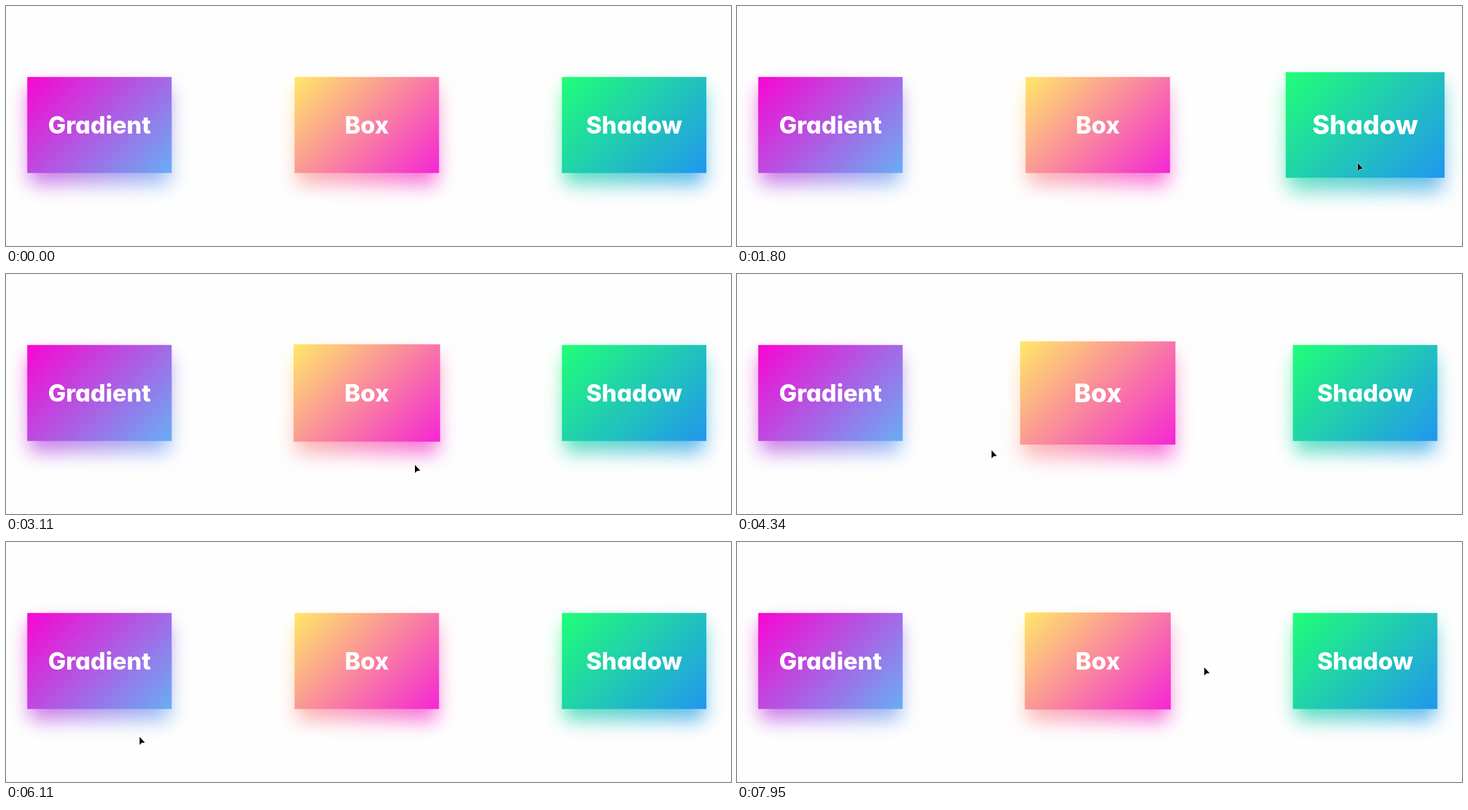
These frames come from a looping animation (1280 px wide and 425 px high, 8 s). An HTML page:

```html
<!DOCTYPE html>
<html lang="en">
<head>
<meta charset="utf-8">
<title>Gradient Box Shadow</title>
<style>
  html, body { margin: 0; width: 100%; height: 100%; overflow: hidden; background: #fefefe; }
  .stage { position: relative; width: 1280px; height: 425px; overflow: hidden; }
  .card { position: absolute; left: 0; top: 0; width: 255px; height: 170px; }
  .glow, .face { position: absolute; inset: 0; background: linear-gradient(135deg, var(--from), var(--to)); }
  .glow { inset: 20px 4px -20px; filter: blur(17px); opacity: .72; }
  .face {
    color: #fff; text-align: center; white-space: nowrap;
    font: 800 42px/169px Inter, "Open Sans", sans-serif;
    font-feature-settings: "cv11";
  }
  .gradient { --from: #f805d2; --to: #68aef4; }
  .box { --from: #ffe868; --to: #f426d5; }
  .shadow { --from: #20ff77; --to: #2196ef; }
  .cursor { position: absolute; left: 0; top: 0; width: 16px; height: 20px; overflow: visible; }
  .cursor path { stroke: #fff; stroke-width: 1.2; stroke-linejoin: round; paint-order: stroke; }
</style>
</head>
<body>
<div class="stage">
  <div class="card gradient"><div class="glow"></div><div class="face">Gradient</div></div>
  <div class="card box"><div class="glow"></div><div class="face">Box</div></div>
  <div class="card shadow"><div class="glow"></div><div class="face">Shadow</div></div>
  <svg class="cursor"><path d="M0 0V14.4L3.6 10.8L9.4 10.2Z"/></svg>
</div>
<script>
const LOOP = 8000, START = 500, STEP = 1000 / 13;
const FADE = 300, GROW = .1;
const WIDTH = 255, HEIGHT = 170, LEFT = 37.5, TOP = 125.7, GAP = 472;

// Turning points of the pointer: time, x, y
const path = [
  [500, 1010, 388], [1000, 1115, 235], [1800, 1096, 278], [2000, 950, 265],
  [2640, 655, 225], [3110, 722, 338], [3450, 665, 250], [4100, 610, 240],
  [4340, 448, 312], [4650, 160, 215], [5260, 250, 251], [6100, 236, 345],
  [6340, 224, 320], [6900, 49, 317], [7180, 55, 314], [7420, 130, 250],
  [7800, 774, 223], [7950, 825, 222]
];

const clamp = v => Math.max(0, Math.min(1, v));

// cubic-bezier(.25, .1, .25, 1)
function ease(x) {
  x = clamp(x);
  let lo = 0, hi = 1;
  const curve = (u, a, b) => 3 * a * u * (1 - u) ** 2 + 3 * b * u * u * (1 - u) + u ** 3;
  for (let i = 0; i < 20; i++) {
    const mid = (lo + hi) / 2;
    if (curve(mid, .25, .25) < x) lo = mid; else hi = mid;
  }
  return curve(lo, .1, 1);
}

// Slope at a point; flat where the direction turns
function slope(i, axis) {
  const a = path[i - 1], b = path[i], c = path[i + 1];
  if (!a || !c) return 0;
  const s1 = (b[axis] - a[axis]) / (b[0] - a[0]);
  const s2 = (c[axis] - b[axis]) / (c[0] - b[0]);
  return s1 * s2 > 0 ? 2 * s1 * s2 / (s1 + s2) : 0;
}

function along(t, axis) {
  let i = 0;
  while (i < path.length - 2 && path[i + 1][0] <= t) i++;
  const a = path[i], b = path[i + 1], d = b[0] - a[0], u = clamp((t - a[0]) / d);
  return a[axis] + (b[axis] - a[axis]) * u * u * (3 - 2 * u)
    + d * u * (1 - u) * ((1 - u) * slope(i, axis) - u * slope(i + 1, axis));
}

const pointer = t => [along(t, 1), along(t, 2)];

// Hover progress from the latest span; leaving early reverses in less time
function hoverAmount(spans, t) {
  const span = spans.filter(s => s.enter <= t).pop();
  if (!span) return 0;
  const up = ease((Math.min(t, span.leave) - span.enter) / FADE);
  return t <= span.leave ? up : up * (1 - ease((t - span.leave) / (FADE * up)));
}

// Follow the pointer once to learn when it is over a card
function findSpans(left) {
  const spans = [];
  let over = false;
  for (let t = START; t < LOOP; t += 4) {
    const [x, y] = pointer(t);
    const size = (1 + GROW * hoverAmount(spans, t)) / 2;
    const inside = Math.abs(x - left - WIDTH / 2) < WIDTH * size
      && Math.abs(y - TOP - HEIGHT / 2) < HEIGHT * size;
    if (inside && !over) spans.push({ enter: t, leave: Infinity });
    if (!inside && over) spans[spans.length - 1].leave = t;
    over = inside;
  }
  return spans;
}

const cards = [...document.querySelectorAll(".card")].map((el, i) => {
  const left = LEFT + GAP * i;
  return { el, left, spans: findSpans(left) };
});
const cursor = document.querySelector(".cursor");

function draw(now) {
  const clock = now % LOOP;
  const t = clock < START ? 0 : 492 + Math.floor((clock - 486) / STEP) * STEP;
  for (const { el, left, spans } of cards) {
    const scale = 1 + GROW * hoverAmount(spans, t);
    el.style.transform = `translate(${left}px, ${TOP}px) scale(${scale})`;
  }
  const [x, y] = pointer(t);
  cursor.style.display = t ? "block" : "none";
  cursor.style.transform = `translate(${x}px, ${y}px)`;
  requestAnimationFrame(draw);
}
requestAnimationFrame(draw);
</script>
</body>
</html>
```
